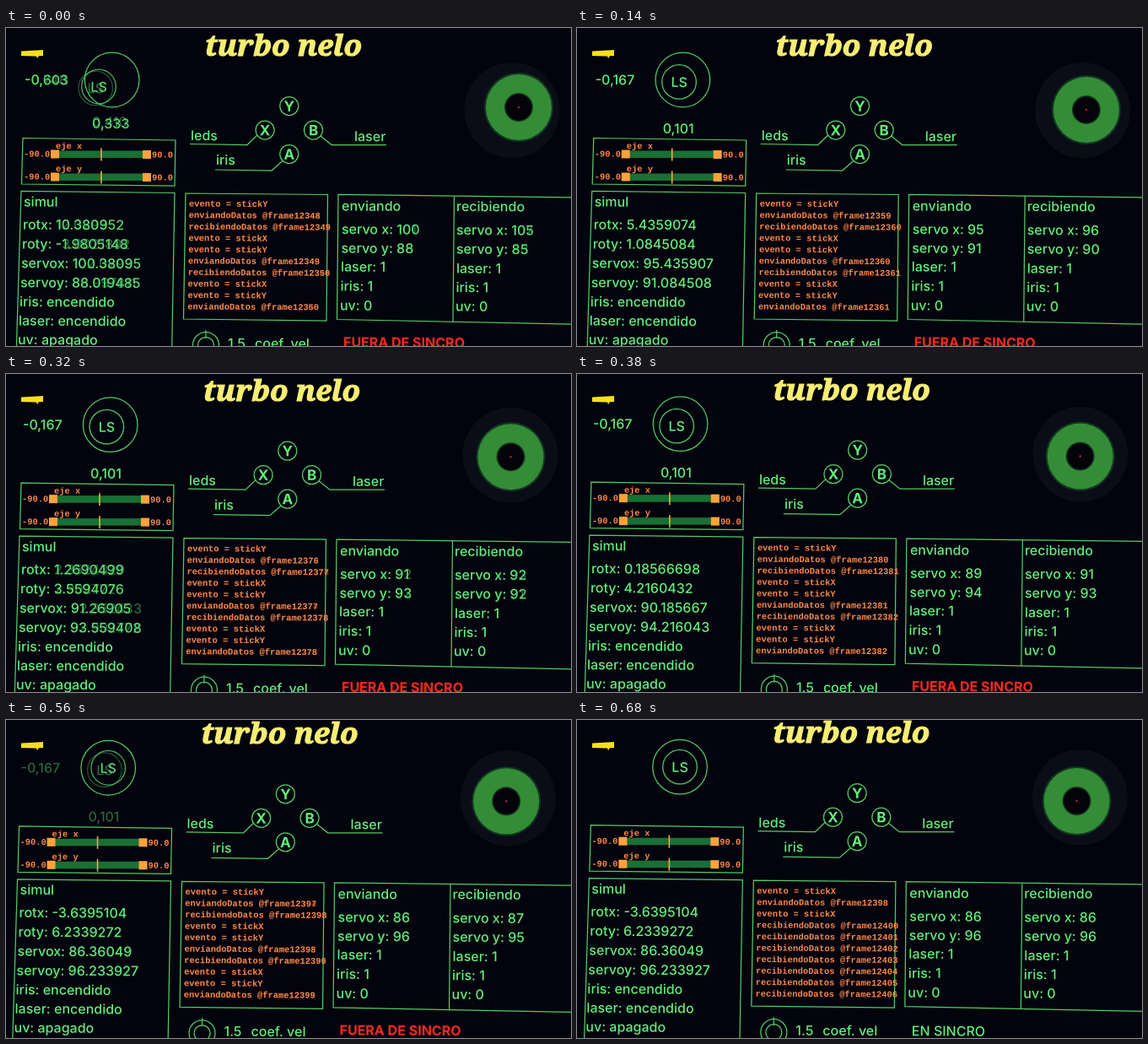
Animation, 670 px wide and 377 px high, one loop 700 ms. Source, as an HTML page with a canvas:

```html
<!DOCTYPE html>
<html lang="es">
<head>
<meta charset="utf-8">
<title>Panel</title>
<style>
html, body { margin: 0; width: 100%; height: 100%; overflow: hidden; background: #03030d; }
canvas { display: block; width: 670px; height: 377px; }
</style>
</head>
<body>
<canvas id="stage" width="670" height="377"></canvas>
<script>
const ctx = document.getElementById('stage').getContext('2d');
const LOOP = 700, TICK = 20, STEP = 40, CENTERED = 560, SYNCED = 600, LAST = 640;
const GREEN = '#62ee7a', LINE = '#52cb66', ORANGE = '#ff8a4a', AMBER = '#ffa23c', BACK = '#03030d';
const SANS = 'Inter, "Open Sans", sans-serif';
const BODY = '500 16px ' + SANS;
const MONO = 'bold 10.4px "Liberation Mono", monospace';

// time followed by two values
const ROTATION = [[0, 10.380952, -1.9805148], [120, 5.4359074, 1.0845084], [240, 3.4358158, 2.2461364],
  [360, .18566698, 4.2160432], [480, -2.0644368, 5.6285133], [520, -3.6395104, 6.2339272]];
const STICK = [[0, -.603, .333], [120, -.167, .101]];
const CAMERA = [[0, 0, 0], [240, -.5, 0], [480, -5, -4], [700, -3.5, -6]];
const EYE = [[0, 608, 94], [240, 601.5, 99], [700, 596, 102]];

function track(keys, t) {
  const end = keys[keys.length - 1];
  if (t >= end[0]) return end.slice(1);
  const i = Math.max(1, keys.findIndex(k => k[0] > t));
  const [a, b] = [keys[i - 1], keys[i]];
  const k = (t - a[0]) / (b[0] - a[0]);
  return [a[1] + (b[1] - a[1]) * k, a[2] + (b[2] - a[2]) * k];
}

function text(str, x, y, color = GREEN, font = BODY, align = 'left') {
  ctx.save();
  ctx.translate(x, y);
  ctx.rotate(.006);
  ctx.font = font;
  ctx.fillStyle = color;
  ctx.textAlign = align;
  ctx.fillText(str, 0, 0);
  ctx.restore();
}

function path(points, close) {
  ctx.beginPath();
  points.forEach(p => ctx.lineTo(...p));
  if (close) ctx.closePath();
  ctx.strokeStyle = LINE;
  ctx.lineWidth = 1.25;
  ctx.stroke();
}

function ring(x, y, r, color = LINE, width = 1.25) {
  ctx.beginPath();
  ctx.arc(x, y, r, 0, 7);
  ctx.strokeStyle = color;
  ctx.lineWidth = width;
  ctx.stroke();
}

function disc(x, y, r, color) {
  ctx.beginPath();
  ctx.arc(x, y, r, 0, 7);
  ctx.fillStyle = color;
  ctx.fill();
}

const digits = v => String(+v.toPrecision(8));
const comma = v => v.toFixed(3).replace('.', ',');

// ten lines that end at the current frame count; stick events stop after syncing
function logLines(t) {
  const count = Math.round(12350 + t * .0877), rest = t >= SYNCED;
  return [...(rest ? 'XeXrrrrrrr' : 'YerXYerXYe')].map((kind, i) => {
    if (kind === 'X' || kind === 'Y') return 'evento = stick' + kind;
    const n = rest ? Math.floor(count - (9 - i) * .9) : count - Math.ceil((6 - i) / 4);
    return (kind === 'e' ? 'enviando' : 'recibiendo') + 'Datos @frame' + n;
  });
}

function axis(name, y) {
  text('eje ' + name, 59, y - 6.5, ORANGE, MONO);
  text('-90.0', 21, y + 3, ORANGE, MONO);
  text('90.0', 173, y + 4, ORANGE, MONO);
  ctx.fillStyle = '#187034';
  ctx.fillRect(62, y - 4, 101, 8.5);
  ctx.fillStyle = AMBER;
  ctx.fillRect(53, y - 5, 10, 10);
  ctx.fillRect(162, y - 4.5, 10, 10);
  ctx.fillRect(112.2, y - 7, 1.6, 15);
}

function eye(t) {
  const [x, y] = track(EYE, t);
  disc(600, 97.5, 56.5, '#0a0d17');
  disc(x, y, 41, '#12391f');
  disc(x, y, 39, '#348c37');
  disc(x, y, 17, '#103a1b');
  disc(x, y, 15.5, '#030309');
  disc(x, y, 1.3, '#a02a20');
}

function title() {
  ctx.font = 'italic 900 35px "Noto Serif", "Liberation Serif", serif';
  ctx.textAlign = 'center';
  ctx.fillStyle = ctx.strokeStyle = '#f6ee72';
  ctx.lineWidth = 1.2;
  ctx.fillText('turbo nelo', 329, 33);
  ctx.strokeText('turbo nelo', 329, 33);
}

function buttons() {
  [...'YBAX'].forEach((c, i) => {
    const a = i * Math.PI / 2;
    const x = 335.8 + 28.7 * Math.sin(a), y = 121 - 28.5 * Math.cos(a);
    ring(x, y, 11);
    text(c, x, y + 6.2, GREEN, 'bold 17px ' + SANS, 'center');
  });
  path([[218, 137.5], [286, 138.5], [298, 127]]);
  path([[248, 168], [315, 169], [328, 157.5]]);
  path([[373, 128], [386, 138.5], [451, 138.5]]);
  text('leds', 219, 133);
  text('iris', 249, 162);
  text('laser', 413, 134);
}

function panels() {
  path([[20, 130.5], [201, 133], [200, 187], [18.5, 185]], true);
  axis('x', 149.5);
  axis('y', 176.5);
  path([[12, 392], [18, 193.5], [200, 195.5], [196.5, 392]]);
  path([[213, 196], [381.5, 197.5], [380, 347], [210.5, 345]], true);
  path([[690, 201], [394, 197.5], [392.5, 345.5], [690, 351.5]]);
  path([[531.5, 199], [530, 348.5]]);

  text('simul', 21, 211.5);
  ['iris: encendido', 'laser: encendido', 'uv: apagado'].forEach((s, i) => text(s, 16 - i, 330 + 22.5 * i));
  text('enviando', 398, 216.5);
  text('recibiendo', 534, 217);
  ['laser: 1', 'iris: 1', 'uv: 0'].forEach((s, i) => {
    text(s, 397 - i * .5, 288.5 + 23 * i);
    text(s, 534 - i * .5, 290.5 + 22.5 * i);
  });

  ring(237, 376, 15.5);
  ring(237, 376, 9.5);
  path([[237, 358], [237, 368]]);
  text('1.5', 263, 379.5);
  text('coef. vel', 295, 379.5);
}

function stick(t) {
  const [sx, sy] = t < CENTERED ? track(STICK, t) : [0, 0];
  const x = 125.7 + sx * 26, y = 61.5 + sy * 24;
  ring(x, y, 20.3);
  text('LS', x, y + 6, GREEN, BODY, 'center');
  if (sx) {
    text(comma(sx), 22, 67);
    text(comma(sy), 102, 127.5 - 26 * sy);
  }
}

function values(t) {
  stick(t);
  const [rx, ry] = track(ROTATION, t);
  Object.entries({ rotx: rx, roty: ry, servox: 90 + rx, servoy: 90 + ry }).forEach(([s, v], i) =>
    text(s + ': ' + digits(v), 20 - i, 238.5 + 22.9 * i));

  // the received servo values trail behind until they sync
  const lag = t < SYNCED ? Math.exp(-Math.max(t, 0) / 30) : 0;
  const off = t < SYNCED ? 1 : 0;
  text('servo x: ' + Math.floor(89.8 + rx), 398, 244);
  text('servo y: ' + Math.floor(90 + ry), 397.5, 266.5);
  text('servo x: ' + Math.floor(90 + rx + off + 4 * lag), 534, 245);
  text('servo y: ' + Math.floor(90 + ry - off - 2 * lag), 534, 267.5);
  logLines(t).forEach((s, i) => text(s, 217 - i * .2, 211.5 + 13.55 * i, ORANGE, MONO));
}

function draw(t) {
  ctx.fillStyle = BACK;
  ctx.fillRect(0, 0, 670, 377);
  ctx.save();
  ctx.translate(...track(CAMERA, t));
  eye(t);
  title();
  buttons();
  panels();
  ring(125.7, 61.5, 32.3);

  // each new state first shows over the fading previous one
  const now = Math.min(LAST, t - t % STEP);
  if (t % STEP < TICK && t <= LAST) {
    ctx.globalAlpha = .42;
    values(now - STEP);
    ctx.globalAlpha = .9;
  }
  values(now);
  ctx.globalAlpha = 1;
  if (t < SYNCED) text('FUERA DE SINCRO', 400, 378, '#ff2a1c', 'bold 16px ' + SANS);
  else text('EN SINCRO', 400.5, 380);
  ctx.restore();

  ctx.fillStyle = '#f5e01c';
  ctx.beginPath();
  [[18, 27.5], [44, 26], [44, 33], [39, 33], [37, 36], [36, 33.5], [18, 33]].forEach(p => ctx.lineTo(...p));
  ctx.fill();
}

let start;
function frame(now) {
  start ??= now;
  draw(Math.floor(((now - start) % LOOP) / TICK) * TICK);
  requestAnimationFrame(frame);
}
draw(0);
requestAnimationFrame(frame);
</script>
</body>
</html>
```
